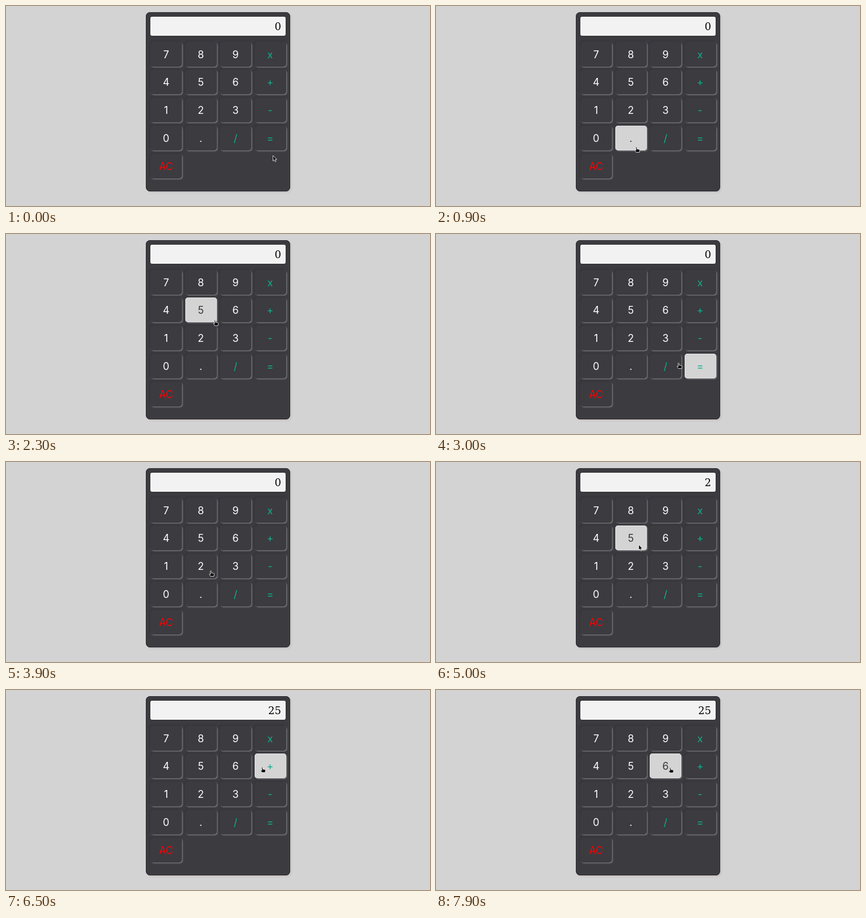
An HTML page for the animation above (8000 ms loop, 752 by 356 pixels).

```html
<!DOCTYPE html>
<html lang="en">
<head>
<meta charset="utf-8">
<title>Calculator</title>
<style>
html, body { margin: 0; width: 100%; height: 100%; overflow: hidden; background: #d3d3d3; }
.calc {
  position: absolute; left: 248px; top: 11px; width: 256px; height: 319px; border-radius: 8px;
  background: #3c3b40; box-shadow: inset 0 0 0 1px #2a292d, 2px 2px 3px #c5bfbc;
}
.display {
  position: absolute; left: 8px; top: 8px; width: 240px; height: 34px; box-sizing: border-box;
  padding-right: 8px; border-radius: 3px; background: #f2f2f2; color: #000;
  box-shadow: 0 0 0 1px #2c2b2f;
  font: 18px/36px "DejaVu Serif", serif; text-align: right;
}
.key {
  --edge: 1.5px 1.5px 2px #77767a, -1.5px -1.5px 3px #353439;
  position: absolute; width: 56px; height: 44px; border-radius: 5px;
  background: #3c3b40; color: #fff; font: 18px/45px Inter, sans-serif; text-align: center;
  box-shadow: var(--edge);
}
.key.hover { background: #d4d4d4; color: #36353a; box-shadow: inset 0 0 0 1px #e2e2e2, var(--edge); }
.key.op, .key.op.hover { color: #0cb08c; }
.key.clear, .key.clear.hover { color: #f00; }
#pointer { position: absolute; left: 0; top: 0; overflow: visible; }
#pointer path { fill: #0c0c0e; stroke: #fff; stroke-width: .8; stroke-linejoin: round; }
#arrow { transform: translate(-.5px, 0); }
#hand { transform: translate(-1.5px, -1.5px); }
</style>
</head>
<body>
<div class="calc"><div class="display" id="display">0</div></div>
<svg id="pointer" width="12" height="14">
  <path id="arrow" d="M0 0V9.8L2.2 7.8L3.8 11.2L5.4 10.5L3.9 7.2H6.8Z"/>
  <path id="hand" d="M-1.3 .8Q-.3-.5.6.8L1.1 4L4.8 4.7Q6 5 5.8 6.4L5.2 10H-.6L-2.8 6.7Q-2.9 5.3-1.5 5.8L-.6 6.4Z"/>
</svg>
<script>
const LOOP = 8000, STEP = 100, KEY_W = 56, KEY_H = 44;
const LABELS = ['7', '8', '9', 'x', '4', '5', '6', '+', '1', '2', '3', '-', '0', '.', '/', '=', 'AC'];
const $ = id => document.getElementById(id);

const keys = LABELS.map((label, i) => {
  const x = 256 + i % 4 * 61.5, y = 63.7 + Math.floor(i / 4) * 49.75;
  const el = document.createElement('div');
  el.className = 'key' + (label === 'AC' ? ' clear' : 'x+-/='.includes(label) ? ' op' : '');
  el.textContent = label;
  el.style.left = x - 248 + 'px';
  el.style.top = y - 11 + 'px';
  document.querySelector('.calc').append(el);
  return { el, x, y };
});

// Pointer strokes through [step, x, y]; the pointer rests between strokes.
const strokes = [
  [[0, 474, 266], [2, 466, 304], [4, 497, 80], [6, 470, 235], [8, 360, 250], [9, 357, 252]],
  [[11, 345, 250], [14, 280, 288], [17, 270, 200], [19, 350, 155], [20, 361, 147]],
  [[22, 361, 147], [25, 395, 170], [28, 462, 222], [30, 432, 231], [33, 498, 205], [35, 498, 188]],
  [[37, 480, 222], [39, 365, 195], [42, 340, 184]],
  [[48, 350, 160], [50, 360, 147], [53, 362, 140]],
  [[55, 361, 142], [57, 376, 138]],
  [[61, 390, 137], [64, 455, 138], [69, 460, 140]],
  [[76, 492, 211], [78, 413, 150], [79, 417, 139]]
];

function pointAt(step) {
  const t = Math.max(step, 0);
  const stroke = strokes.findLast(s => s[0][0] <= t);
  const i = stroke.findLastIndex(p => p[0] <= t);
  const [t0, x0, y0] = stroke[i];
  if (i === stroke.length - 1) return [x0, y0];
  const [t1, x1, y1] = stroke[i + 1];
  const f = (t - t0) / (t1 - t0);
  return [x0 + (x1 - x0) * f, y0 + (y1 - y0) * f];
}

function keyAt([x, y]) {
  return keys.find(k => x >= k.x && x < k.x + KEY_W && y >= k.y && y < k.y + KEY_H);
}

function draw(now) {
  const step = Math.floor(now % LOOP / STEP);
  const [x, y] = pointAt(step);
  // The highlight trails the pointer by one step, its shape by two.
  const hovered = keyAt(pointAt(step - 1));
  const onKey = !!keyAt(pointAt(step - 2));
  keys.forEach(k => k.el.classList.toggle('hover', k === hovered));
  $('pointer').style.transform = `translate(${x}px, ${y}px)`;
  $('hand').style.display = onKey ? '' : 'none';
  $('arrow').style.display = onKey ? 'none' : '';
  $('display').textContent = step < 46 ? '0' : step < 55 ? '2' : '25';
}

const begin = performance.now();
function tick() {
  draw(performance.now() - begin);
  requestAnimationFrame(tick);
}
tick();
</script>
</body>
</html>
```
